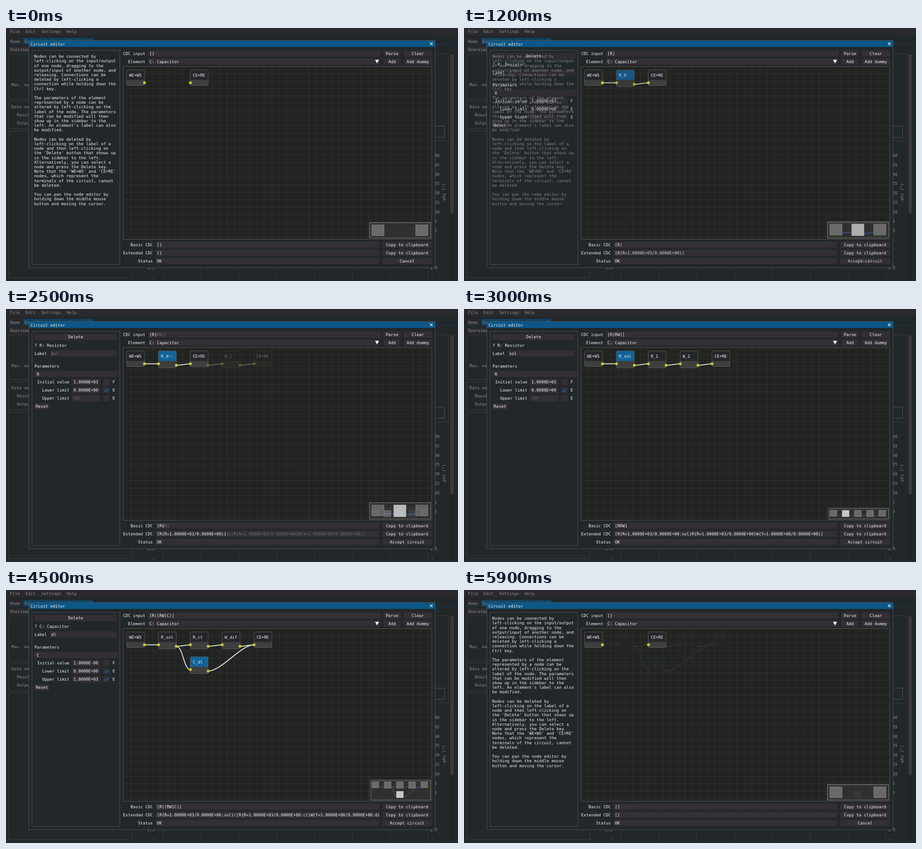
Write an HTML page with a canvas that moves like this. It is 999 px wide and 561 px high and loops after 6000 ms.

```html
<!DOCTYPE html>
<html lang="en">
<head>
<meta charset="utf-8">
<title>Circuit editor</title>
<style>
  html, body { margin: 0; width: 100%; height: 100%; overflow: hidden; background: #22272a; }
  canvas { display: block; }
</style>
</head>
<body>
<canvas id="stage" width="999" height="561"></canvas>
<script>
const W = 999, H = 561;
const HOLD = 1000, STEP = 100, PERIOD = 1500;
const MIX = [0, 0.167, 0.444, 0.722, 0.907, 0.98];
const UI = 0.6843;
const COL = {
  win: '#22272a', frame: '#332f34', line: '#4d5053', text: '#f4f4f4', dim: '#6b696d',
  back: '#8d8f90', title: '#0c5788', pick: '#10639a', pin: '#c9c928'
};
const HELP = `Nodes can be connected by
left-clicking on the input/output
of one node, dragging to the
output/input of another node, and
releasing. Connections can be
deleted by left-clicking a
connection while holding down the
Ctrl key.

The parameters of the element
represented by a node can be
altered by left-clicking on the
label of the node. The parameters
that can be modified will then
show up in the sidebar to the
left. An element's label can also
be modified.

Nodes can be deleted by
left-clicking on the label of a
node and then left-clicking on
the 'Delete' button that shows up
in the sidebar to the left.
Alternatively, you can select a
node and press the Delete key.
Note that the 'WE+WS' and 'CE+RE'
nodes, which represent the
terminals of the circuit, cannot
be deleted.

You can pan the node editor by
holding down the middle mouse
button and moving the cursor.`.split('\n');

// Nodes: label, column, row. Links: index pairs.
const SCENES = [
  {
    cdc: '[]', basic: '[]', ext: '[]', action: 'Cancel',
    nodes: [['WE+WS', 0, 0], ['CE+RE', 2, 0]], links: [],
    map: { y: 431, inset: 0, w: 27, h: 24, x: [808.5, 905.5], top: 436.5 }
  },
  {
    cdc: '[R]', basic: '[R]', ext: '[R{R=1.0000E+03/0.0000E+00}]', action: 'Accept circuit',
    nodes: [['WE+WS', 0, 0], ['R_0', 1, 0], ['CE+RE', 2, 0]], links: [[0, 1], [1, 2]], pick: 1,
    map: { y: 429, inset: 0, w: 27, h: 24, x: [808.5, 857, 905.5], top: 434.5 },
    form: { sym: 'R', name: 'Resistor', label: '0', faint: true, init: '1.0000E+03' }
  },
  {
    cdc: '[R[RW]]', basic: '[RRW]', action: 'Accept circuit',
    ext: '[R{R=1.0000E+03/0.0000E+00:sol}R{R=1.0000E+03/0.0000E+00}W{Y=1.0000E+00/0.0000E+00}]',
    nodes: [['WE+WS', 0, 0], ['R_sol', 1, 0], ['R_1', 2, 0], ['W_2', 3, 0], ['CE+RE', 4, 0]],
    links: [[0, 1], [1, 2], [2, 3], [3, 4]], pick: 1,
    map: { y: 440, inset: 3, w: 15, h: 13, x: [809, 836, 863, 890, 917], top: 446.5 },
    form: { sym: 'R', name: 'Resistor', label: 'sol', init: '1.0000E+03' }
  },
  {
    cdc: '[R([RW]C)]', basic: '[R([RW]C)]', action: 'Accept circuit',
    ext: '[R{R=1.0000E+03/0.0000E+00:sol}([R{R=1.0000E+03/0.0000E+00:ct}W{Y=1.0000E+00/0.0000E+00:dif}]C{C=1.0000E-06})]',
    nodes: [['WE+WS', 0, 0], ['R_sol', 1, 0], ['R_ct', 2, 0], ['W_dif', 3, 0], ['CE+RE', 4, 0], ['C_dl', 2, 1]],
    links: [[0, 1], [1, 2], [2, 3], [3, 4], [1, 5], [5, 4]], pick: 5,
    map: { y: 420, inset: 3, w: 15, h: 13, x: [809, 836, 863, 890, 917, 863], top: 425.5, drop: 21 },
    form: { sym: 'C', name: 'Capacitor', label: 'dl', init: '1.0000E-06', upper: '1.0000E+03' }
  }
];

let c;

function fill(x, y, w, h, color, r = 0) {
  c.fillStyle = color;
  c.beginPath();
  c.roundRect(x, y, w, h, r);
  c.fill();
}

function outline(x, y, w, h, color = COL.line, r = 0) {
  c.strokeStyle = color;
  c.lineWidth = 1;
  c.beginPath();
  c.roundRect(x + 0.5, y + 0.5, w - 1, h - 1, r);
  c.stroke();
}

function path(points, color, width) {
  c.strokeStyle = color;
  c.lineWidth = width;
  c.beginPath();
  points.forEach(([x, y], i) => i ? c.lineTo(x, y) : c.moveTo(x, y));
  c.stroke();
}

// y is the middle of the capitals
function text(str, x, y, color = COL.text, align = 'left') {
  c.save();
  c.translate(x, y + 3);
  c.scale(UI, UI);
  c.font = '13.3px "DejaVu Sans Mono", monospace';
  c.textAlign = align;
  c.fillStyle = color;
  c.fillText(str, 0, 0);
  c.restore();
}

function button(label, x, y, w) {
  fill(x, y, w, 14, COL.frame);
  text(label, x + w / 2, y + 7.2, COL.text, 'center');
}

function field(str, x, y, w, color) {
  fill(x, y, w, 14, COL.frame);
  c.save();
  c.beginPath();
  c.rect(x, y, w, 14);
  c.clip();
  text(str, x + 3, y + 7.2, color);
  c.restore();
}

function backdrop() {
  const edge = '#3b3e40';
  fill(0, 0, W, H, COL.win);
  fill(0, 0, W, 16, '#2a292d');
  [['File', 9], ['Edit', 43], ['Settings', 78], ['Help', 134]].forEach(([s, x]) => text(s, x, 8, COL.back));
  fill(6, 22, 29, 14, '#2a292d');
  text('Home', 9, 29.5, COL.back);
  fill(38, 22, 155, 14, '#104261');
  text('Example project - Version 3', 41, 29.5, COL.back);
  path([[6, 36.5], [993, 36.5]], '#1c3b4e', 1);
  fill(6, 41, 50, 13, '#2d2b30');
  text('Overview', 9, 47.5, COL.back);
  outline(6, 57, 273, 100, edge);
  outline(6, 161, 273, 63, edge);
  outline(6, 228, 273, 326, edge);
  [['Max. num', 12, 126], ['Data set', 12, 175], ['Result', 24, 193], ['Output', 24, 211]]
    .forEach(([s, x, y]) => text(s, x, y, COL.back));

  outline(285, 57, 694, 194, edge);
  outline(900, 217, 70, 26, '#55564f');
  for (let x = 347.5; x < 940; x += 83.6) path([[x, 480], [x, 556]], '#36393a', 1);
  for (let i = 0; i < 9; i++) text(String(40 - i * 5), 947, 283 + i * 20.8, COL.back);
  text('1.5', 312, 532, COL.back);
  text('1.5', 937, 532, COL.back);
  fill(325, 553, 1.5, 1.5, COL.back);
  fill(941, 553, 1.5, 1.5, COL.back);
  c.save();
  c.translate(968, 366);
  c.rotate(-Math.PI / 2);
  text('-phi (°)', 0, 0, COL.back, 'center');
  c.restore();
  fill(980, 56, 12, 498, '#202427');
  fill(982, 58, 8, 353, '#3b393d', 3);
}

function frameOfModal() {
  fill(50, 27, 899, 505, COL.win);
  fill(50, 27, 899, 15, COL.title);
  outline(50, 27, 899, 505);
  text('Circuit editor', 54, 35.5);
  path([[937, 32], [943, 38]], COL.text, 1.1);
  path([[943, 32], [937, 38]], COL.text, 1.1);
  outline(57, 49, 195, 476);
}

function form({ sym, name, label, faint, init, upper }) {
  button('Delete', 63, 55, 182);
  text(`? ${sym}: ${name}`, 63, 81);
  text('Label', 63, 99);
  field(label, 97, 91.5, 148, faint ? COL.dim : COL.text);
  text('Parameters', 63, 126.5);
  fill(62, 137, 187, 14, COL.frame);
  text(sym, 68, 144.5);
  [['Initial value', init, false, 'F'], ['Lower limit', '0.0000E+00', true, 'E'], ['Upper limit', upper, !!upper, 'E']]
    .forEach(([title, value, on, flag], i) => {
      const y = 155 + i * 18;
      text(title, 140, y + 7.2, COL.text, 'right');
      field(value || 'INF', 146, y, 62.5, value ? COL.text : '#59575b');
      fill(214.5, y, 14.5, 14, COL.frame);
      if (on) path([[217.5, y + 7], [220.5, y + 10.3], [226.5, y + 4]], '#0d6aab', 1.8);
      text(flag, 235.5, y + 7.2);
    });
  button('Reset', 63, 209, 33);
}

function nodeBox([label, col, row]) {
  const end = label === 'WE+WS' || label === 'CE+RE';
  const x = 266.5 + col * 70.4, y = 93 + row * 55;
  return {
    label, x, y, h: end ? 34.5 : 37.5,
    input: label !== 'WE+WS' && [x + 0.2, y + 28.5],
    output: label !== 'CE+RE' && [x + 39.5, y + (end ? 28.5 : 31.8)]
  };
}

function curve([x1, y1], [x2, y2], color, width) {
  const d = Math.hypot(x2 - x1, y2 - y1) / 4;
  c.strokeStyle = color;
  c.lineWidth = width;
  c.beginPath();
  c.moveTo(x1, y1);
  c.bezierCurveTo(x1 + d, y1, x2 - d, y2, x2, y2);
  c.stroke();
}

function drawNode(n, picked) {
  fill(n.x, n.y, 39.5, n.h, '#3e3f3e', 2.7);
  fill(n.x, n.y, 39.5, 22.3, picked ? COL.pick : '#24272a', [2.7, 2.7, 0, 0]);
  c.strokeStyle = '#62645f';
  c.lineWidth = 0.8;
  c.beginPath();
  c.roundRect(n.x, n.y, 39.5, n.h, 2.7);
  c.stroke();
  text(n.label, n.x + 5.6, n.y + 11.7);
  [n.input, n.output].filter(Boolean).forEach(([x, y]) => {
    c.fillStyle = COL.pin;
    c.beginPath();
    c.arc(x, y, 3, 0, 7);
    c.fill();
  });
}

function minimap({ map: m, nodes, links, pick }) {
  const bottom = 466.5, right = 939;
  fill(803, m.y, 136, bottom - m.y, 'rgba(25,25,25,.6)');
  outline(803, m.y, 136, bottom - m.y, 'rgba(150,150,150,.4)');
  c.save();
  c.beginPath();
  c.rect(803, m.y, right - 803, bottom - m.y);
  c.clip();
  const top = m.y + (m.inset ? 2 : 0);
  fill(803 + m.inset, top, 136, 50, 'rgba(200,200,200,.1)');
  path([[803.5 + m.inset, bottom], [803.5 + m.inset, top + 0.7], [right, top + 0.7]], 'rgba(200,200,200,.5)', 1);
  path([[803 + m.inset, bottom - 0.7], [right - 0.7, bottom - 0.7], [right - 0.7, top]], 'rgba(200,200,200,.35)', 1);

  const boxes = nodes.map(([label, , row], i) => {
    const end = label === 'WE+WS' || label === 'CE+RE';
    return { x: m.x[i], y: m.top + row * (m.drop || 0), h: m.h + (end ? 0 : m.h / 12) };
  });
  links.forEach(([a, b]) => {
    const p = boxes[a], q = boxes[b];
    curve([p.x + m.w, p.y + p.h * 0.83], [q.x, q.y + m.h * 0.81], 'rgba(61,125,215,.75)', m.inset ? 0.9 : 1.6);
  });
  boxes.forEach((b, i) => {
    fill(b.x, b.y, m.w, b.h, i === pick ? '#c8c8c8' : '#696a69', 1.5);
    c.strokeStyle = i === pick ? '#d4d4d4' : '#8d8d8d';
    c.lineWidth = 0.8;
    c.strokeRect(b.x, b.y, m.w, b.h);
  });
  c.restore();
}

function editor(scene) {
  const x0 = 259, y0 = 85, w = 682, h = 384, grid = 16.42;
  fill(x0, y0, w, h, '#222421');
  const gridColor = 'rgba(200,200,200,.12)';
  for (let x = x0 + grid; x < x0 + w; x += grid) path([[x, y0], [x, y0 + h]], gridColor, 0.7);
  for (let y = y0 + grid; y < y0 + h; y += grid) path([[x0, y], [x0 + w, y]], gridColor, 0.7);
  outline(x0 - 0.5, y0, w + 1, h, '#545653');

  const nodes = scene.nodes.map(nodeBox);
  nodes.forEach((n, i) => drawNode(n, i === scene.pick));
  scene.links.forEach(([a, b]) => curve(nodes[a].output, nodes[b].input, '#dcdcd8', 2.05));
  nodes.forEach(n => [n.input, n.output].filter(Boolean).forEach(([x, y]) => {
    c.fillStyle = COL.pin;
    c.beginPath();
    c.arc(x, y, 3, 0, 7);
    c.fill();
  }));
  minimap(scene);
}

function render(scene) {
  const canvas = document.createElement('canvas');
  canvas.width = W;
  canvas.height = H;
  c = canvas.getContext('2d', { willReadFrequently: true });
  backdrop();
  frameOfModal();
  if (scene.form) form(scene.form);
  else HELP.forEach((line, i) => text(line, 62, 63.2 + i * 10.2));

  text('CDC input', 308, 57, COL.text, 'right');
  field(scene.cdc, 314, 49.5, 513.5);
  button('Parse', 834, 49.5, 38.5);
  button('Clear', 879, 49.5, 62.5);
  text('Element', 308, 75, COL.text, 'right');
  field('C: Capacitor', 314, 67.5, 513.5);
  c.fillStyle = COL.text;
  c.beginPath();
  c.moveTo(815.5, 70.5);
  c.lineTo(824.5, 70.5);
  c.lineTo(820, 78.5);
  c.fill();
  button('Add', 834, 67.5, 38.5);
  button('Add dummy', 879, 67.5, 62.5);

  editor(scene);

  [['Basic CDC', scene.basic, 'Copy to clipboard'],
   ['Extended CDC', scene.ext, 'Copy to clipboard'],
   ['Status', 'OK', scene.action]].forEach(([label, value, action], i) => {
    const y = 473.5 + i * 18;
    text(label, 324.5, y + 7.2, COL.text, 'right');
    field(value, 330.5, y, 495);
    button(action, 831.5, y, 110);
  });
  return c.getImageData(0, 0, W, H);
}

// Cross-fades are mixed in linear light.
const toLinear = Float32Array.from({ length: 256 }, (_, i) => {
  const v = i / 255;
  return v <= 0.04045 ? v / 12.92 : ((v + 0.055) / 1.055) ** 2.4;
});
const SIZE = 16383;
const toByte = Uint8Array.from({ length: SIZE + 1 }, (_, i) => {
  const v = i / SIZE;
  return Math.round(255 * (v <= 0.0031308 ? v * 12.92 : 1.055 * v ** (1 / 2.4) - 0.055));
});

function blend(a, b, k) {
  const out = new ImageData(W, H);
  const p = a.data, q = b.data, o = out.data;
  for (let i = 0; i < o.length; i++) {
    o[i] = p[i] === q[i] ? p[i]
      : toByte[Math.round(SIZE * (toLinear[p[i]] * (1 - k) + toLinear[q[i]] * k))];
  }
  return out;
}

const stills = SCENES.map(render);
const pictures = stills.map((still, i) =>
  MIX.map(k => k ? blend(still, stills[(i + 1) % stills.length], k) : still));

const stage = document.getElementById('stage').getContext('2d');
let shown;

function tick() {
  const t = performance.now() % (PERIOD * SCENES.length);
  const scene = Math.floor(t / PERIOD);
  const phase = t % PERIOD;
  const step = phase < HOLD ? 0 : 1 + Math.floor((phase - HOLD) / STEP);
  const picture = pictures[scene][step];
  if (picture !== shown) stage.putImageData(shown = picture, 0, 0);
  requestAnimationFrame(tick);
}
tick();
</script>
</body>
</html>
```
